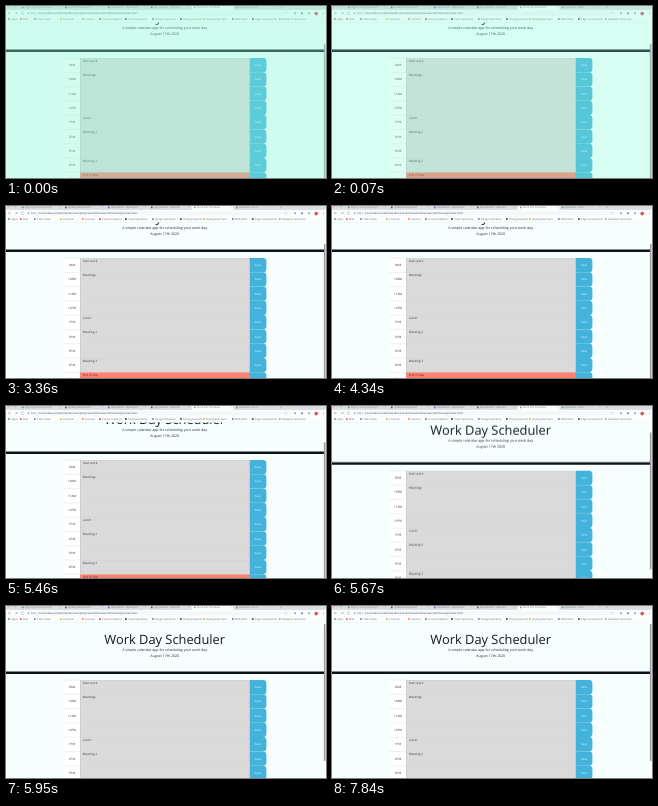
These frames come from a looping animation (320 px wide and 172 px high, 8 s). An HTML page:

```html
<!DOCTYPE html>
<html lang="en">
<head>
<meta charset="utf-8">
<title>Work Day Scheduler</title>
<style>
html, body { margin: 0; width: 100%; height: 100%; overflow: hidden; background: #f6fefe; }
svg { display: block; width: 100vw; height: 100vh; }
text { font-family: "Open Sans", "Noto Sans", sans-serif; text-rendering: geometricPrecision; white-space: pre; }
</style>
</head>
<body>
<svg id="stage" viewBox="0 0 320 172"></svg>
<script>
const LOOP = 8000;
const stage = document.getElementById('stage');

function add(parent, tag, attrs = {}, text = '') {
  const node = document.createElementNS('http://www.w3.org/2000/svg', tag);
  for (const key in attrs) node.setAttribute(key, attrs[key]);
  node.textContent = text;
  parent.append(node);
  return node;
}
const rect = (parent, x, y, width, height, fill, more) =>
  add(parent, 'rect', { x, y, width, height, fill, ...more });
const dot = (parent, cx, cy, r, fill) => add(parent, 'circle', { cx, cy, r, fill });
const label = (parent, x, y, size, fill, text, anchor = 'start') =>
  add(parent, 'text', { x, y, 'font-size': size, fill, 'text-anchor': anchor }, text);

// Holds each [ms, value] until the next one.
function play(node, property, steps) {
  const frames = steps.map(([ms, value]) =>
    ({ offset: ms / LOOP, [property]: value, easing: 'steps(1, end)' }));
  frames.push({ offset: 1, [property]: steps[steps.length - 1][1] });
  node.animate(frames, { duration: LOOP, iterations: Infinity });
}

function drawPage(page) {
  label(page, 158.7, 38, 12.85, '#151a1c', 'Work Day Scheduler', 'middle');
  label(page, 159, 45.2, 3.53, '#22282a', 'A simple calendar app for scheduling your work day.', 'middle');
  label(page, 158.7, 51.3, 3.53, '#22282a', 'August 17th 2020', 'middle');
  rect(page, 0, 65.5, 318, 2.5, '#0d1214');

  const hours = ['9AM', '10AM', '11AM', '12PM', '1PM', '2PM', '3PM', '4PM', '5PM'];
  const tasks = ['Start work', 'Meetings', '', '', 'Lunch', 'Meeting 2', '', 'Meeting 3', 'End of Day'];
  const pitch = 14.28;
  hours.forEach((hour, i) => {
    const y = 74 + i * pitch;
    rect(page, 57.5, y, 16.5, pitch, '#fff');
    add(page, 'path', { d: `M57.5 ${y + .1}h16.5`, stroke: '#a8b0b2', 'stroke-width': .3, 'stroke-dasharray': '.7 .4' });
    label(page, 66, y + 8.2, 3.05, '#33383a', hour, 'middle');
    rect(page, 74, y, 170, pitch, i === 8 ? '#fc8170' : '#dadada');
    rect(page, 74, y, 170, .3, '#c3c7c8');
    rect(page, 74, y, .3, pitch, '#b0b5b7');
    label(page, 76.8, y + 4, 3.05, i === 8 ? '#6b2f2a' : '#33383a', tasks[i]);
    add(page, 'path', {
      d: `M244 ${y}h13q3.4 0 3.4 3.4v${pitch - 6.8}q0 3.4 -3.4 3.4h-13z`,
      fill: '#44b3db'
    });
    rect(page, 243.8, y, .3, pitch, '#7d929a');
    label(page, 252, y + 8.2, 2.9, '#e6f7fc', 'Save', 'middle');
  });
}

function drawBrowser(chrome) {
  rect(chrome, 0, 0, 320, 16.4, '#fbfdfd');
  rect(chrome, 0, 0, 320, 3.9, '#d9dddf');
  ['#e59c96', '#e0cb98', '#a3c7a5'].forEach((fill, i) => dot(chrome, 2.2 + i * 3.4, .6, .8, fill));

  const tabs = [
    [16, '#6c8797', 'Sign In to Your Account'],
    [59, '#50575b', 'Student Dashboard'],
    [102, '#6d5cad', 'Homework - Week Five'],
    [145, '#50575b', 'Day planner - samples'],
    [188, '#8b9498', 'Work Day Scheduler'],
    [230, '#768893', 'Scheduler notes']
  ];
  rect(chrome, 185.5, 0, 42, 4, '#fbfdfd', { rx: 1 });
  tabs.forEach(([x, fill, text]) => {
    dot(chrome, x + .8, 1.4, .9, fill);
    label(chrome, x + 3, 2.4, 2.5, '#747b80', text);
    label(chrome, x + 37, 2.4, 2.5, '#858c90', '×');
  });
  label(chrome, 274, 2.8, 3.4, '#7d8487', '+');

  add(chrome, 'path', {
    d: 'M5 7.1H2.4m1.1-1.1-1.1 1.1 1.1 1.1M8.8 7.1h2.6m-1.1-1.1 1.1 1.1-1.1 1.1M18 6.3a1.4 1.4 0 1 0 .2 1.3',
    fill: 'none', stroke: '#7d8488', 'stroke-width': .4
  });
  rect(chrome, 20, 4.9, 264, 4.7, '#f5f8f9', { rx: 2.3 });
  dot(chrome, 22.6, 7.2, .7, '#858d90');
  label(chrome, 25, 8.2, 2.6, '#6a7174', 'File |');
  label(chrome, 32.5, 8.2, 2.6, '#4a5053', '/Users/devuser/Desktop/Bootcamp/homework/homework05/Develop/index.html');
  label(chrome, 280, 8.2, 3, '#8a9195', '☆', 'middle');
  ['#959ca0', '#567ec0', '#959ca0'].forEach((fill, i) => dot(chrome, 289 + i * 7, 7.3, 1, fill));
  dot(chrome, 310.2, 7.6, 1.8, '#d4505c');
  [-1.2, 0, 1.2].forEach(dy => dot(chrome, 317.3, 7.4 + dy, .3, '#777'));

  const bookmarks = [
    [2, '#788287', 'Apps'],
    [14, '#d65f55', 'Mail'],
    [28, '#5c7fc0', 'Class notes'],
    [54, '#d8b04e', 'Tutorials'],
    [76, '#d98a4a', 'Lessons'],
    [93, '#b8474b', 'Course material'],
    [119, '#24292c', 'Code repository'],
    [146, '#4d86b8', 'Design reference'],
    [174, '#33383b', 'Study group list'],
    [197, '#d0a545', 'Style guides here'],
    [226, '#4d73b6', 'Web fonts'],
    [246, '#33383b', 'Page components'],
    [273, '#9ba3a7', 'Research resources']
  ];
  bookmarks.forEach(([x, fill, text]) => {
    dot(chrome, x + .9, 13, .9, fill);
    label(chrome, x + 3.1, 14, 2.6, '#626a6e', text);
  });
  rect(chrome, 0, 16.2, 320, .3, '#e2e9ea');
}

rect(stage, 0, 0, 320, 172, '#f6fefe');
const page = add(stage, 'g');
drawPage(page);
const thumb = rect(stage, 317.9, 18, 1.6, 137, '#969c9e', { rx: .8 });
drawBrowser(add(stage, 'g'));
const tint = rect(stage, 0, 0, 320, 172, '#87f6d3');

const scroll = [
  [0, 22], [5460, 20], [5530, 17], [5600, 13], [5670, 9.3],
  [5740, 5.5], [5810, 2.5], [5880, .8], [5950, 0]
];
const scrollBy = ratio => scroll.map(([ms, y]) => [ms, `translateY(${y * ratio}px)`]);
play(page, 'transform', scrollBy(-1));
play(thumb, 'transform', scrollBy(.9));
play(tint, 'opacity', [[0, .37], [70, .27], [140, .17], [210, .08], [280, 0]]);
</script>
</body>
</html>
```
